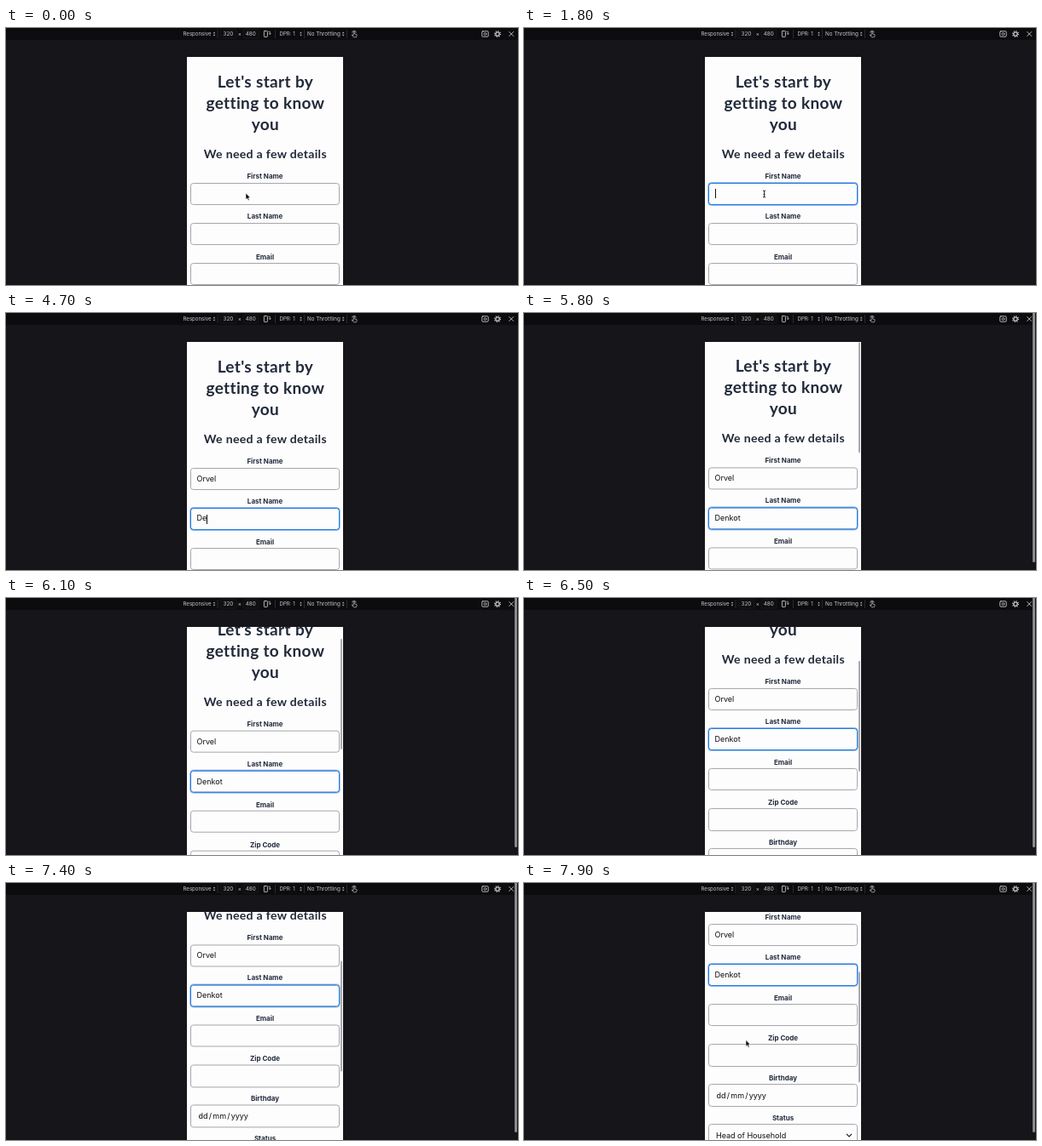
Recreate the animation shown at these times as an HTML page. Size 600 by 302 pixels, loop 8000 ms.

```html
<!DOCTYPE html>
<html lang="en">
<head>
<meta charset="utf-8">
<title>Form in responsive view</title>
<style>
@property --y { syntax: "<length>"; inherits: true; initial-value: 0px; }
html, body { margin: 0; width: 100%; height: 100%; overflow: hidden; background: #16151a; }
.stage { position: relative; width: 600px; height: 302px; overflow: hidden; background: #16151a; }
.bar { position: absolute; left: 0; top: 0; }
.bar text { font: 6.3px Inter, sans-serif; fill: #c9c9ce; }

.panel {
  position: absolute; left: 212px; top: 34px; width: 183px; height: 268px;
  overflow: hidden; background: #fdfdfe; color: #212a39;
  animation: scroll 8s infinite;
}
.page { position: absolute; inset: 0; transform: translateY(calc(-1 * var(--y))); }
h1, h2 { position: absolute; left: .4px; width: 100%; margin: 0; text-align: center; font-family: Lato, sans-serif; font-weight: 700; }
h1 { top: 15.8px; font-size: 19px; line-height: 25.2px; letter-spacing: .35px; }
h2 { top: 104px; font-size: 14.1px; line-height: 20px; letter-spacing: .3px; white-space: nowrap; }
.form { position: absolute; left: 4px; top: 134.3px; width: 175px; }
.field { height: 47.15px; }
.label { margin-bottom: 1.4px; text-align: center; font: 700 8px/12px Inter, sans-serif; }
.box {
  position: relative; box-sizing: border-box; height: 26.5px; padding-left: 6.5px;
  display: flex; align-items: center; border: 1px solid #a6a6ab; border-radius: 3.5px;
  font: 9px/12px Inter, sans-serif; color: #0c0c0e; background: #fdfdfe; white-space: nowrap;
}
.ring { position: absolute; inset: -1px; border: 1px solid #2479de; border-radius: 3.5px; box-shadow: 0 0 0 .4px #2479de; }
.caret { width: .9px; height: 11px; background: #111; }
.date, .select { padding-left: 8px; }
.date span { padding: 0 .6px; }
.select svg { position: absolute; right: 5px; top: 9.5px; }

.thumb { position: absolute; background: #a9a9ad; border-radius: 2px; }
.inner { right: 1px; top: 0; width: 2.2px; height: 130px; transform: translateY(calc(var(--y) * .525)); }
.outer { left: 595.5px; top: -3px; width: 3px; height: 296px; background: #8b8b8f; }

.mouse { position: absolute; left: 0; top: 0; overflow: visible; animation: move 8s infinite; }

@keyframes scroll {
  0%, 71.25% { --y: 0px; }
  72.5% { --y: .6px; animation-timing-function: cubic-bezier(.4, 0, .6, .86); }
  81.25% { --y: 76px; animation-timing-function: cubic-bezier(.3, .6, .6, 1); }
  88.75% { --y: 87px; animation-timing-function: cubic-bezier(.3, 0, .4, 1); }
  98.75%, 100% { --y: 134px; }
}
@keyframes move {
  0%, 94% { transform: translate(281px, 194px); }
  98.5%, 100% { transform: translate(260px, 184.5px); }
}
</style>
</head>
<body>
<div class="stage">
  <svg class="bar" width="600" height="15">
    <defs>
      <path id="updown" d="M-1.3 -.7L0 -2.5L1.3 -.7ZM-1.3 .7L0 2.5L1.3 .7Z" fill="#b9b9be"/>
    </defs>
    <rect width="600" height="14" fill="#0c0c0e"/>
    <g fill="#0f0f11" stroke="#222226" stroke-width=".5">
      <rect x="251" y="1.8" width="19" height="10.4" rx="1"/>
      <rect x="278" y="1.8" width="18" height="10.4" rx="1"/>
    </g>
    <path d="M248 2V12M315.5 2V12M349.5 2V12M399.5 2V12" stroke="#38383e" stroke-width=".7"/>
    <text x="207.5" y="9.3" style="font-size:6.1px">Responsive</text>
    <text x="254.5" y="9.3">320</text>
    <text x="271.8" y="9.3">×</text>
    <text x="280.7" y="9.3">480</text>
    <text x="320.5" y="9.3" style="font-size:6.1px">DPR: 1</text>
    <text x="353" y="9.3">No Throttling</text>
    <use href="#updown" x="244" y="7"/>
    <use href="#updown" x="345.5" y="7"/>
    <use href="#updown" x="395.2" y="7"/>
    <g fill="none" stroke="#c4c4c9" stroke-width=".9" stroke-linecap="round" stroke-linejoin="round">
      <rect x="302.4" y="3.5" width="4" height="7" rx=".7"/>
      <path d="M307.8 4.2H309.3V7.3M308.2 6.4L309.3 7.6L310.3 6.4" stroke-width=".7"/>
      <path d="M407.2 8.2V4.6Q408 3.8 408.7 4.6V7L411 7.6Q411.6 8.8 410.4 10.8H407.4L405.4 8.4ZM405.7 5A2.3 2.3 0 0 1 410.2 5" stroke-width=".7"/>
      <rect x="557.8" y="3.8" width="7.4" height="6.4" rx="1"/>
      <circle cx="561.5" cy="7" r="1.4" stroke-width=".8"/>
      <circle cx="576" cy="7" r="2.2" stroke-width="1.3"/>
      <circle cx="576" cy="7" r="3.4" stroke-width="1.3" stroke-dasharray="1.1 1.57" stroke-linecap="butt"/>
      <path d="M589.7 4.5L594.7 9.5M594.7 4.5L589.7 9.5"/>
    </g>
  </svg>

  <div class="panel">
    <div class="page">
      <h1>Let's start by<br>getting to know<br>you</h1>
      <h2>We need a few details</h2>
      <div class="form">
        <div class="field"><div class="label">First Name</div><div class="box" id="first"></div></div>
        <div class="field"><div class="label">Last Name</div><div class="box" id="last"></div></div>
        <div class="field"><div class="label">Email</div><div class="box"></div></div>
        <div class="field"><div class="label">Zip Code</div><div class="box"></div></div>
        <div class="field"><div class="label">Birthday</div><div class="box date"><span>dd</span><span>/</span><span>mm</span><span>/</span><span>yyyy</span></div></div>
        <div class="field"><div class="label">Status</div><div class="box select">Head of Household
          <svg width="8" height="6"><path d="M1 1L4 4L7 1" fill="none" stroke="#222" stroke-width="1.1"/></svg></div></div>
      </div>
    </div>
    <div class="thumb inner"></div>
  </div>
  <div class="thumb outer"></div>

  <svg class="mouse" width="1" height="1">
    <path class="arrow" d="M0 0V7.6L1.7 6L2.9 8.7L4.2 8.1L3 5.5H5.3Z" fill="#000" stroke="#fff" stroke-width=".6"/>
    <path class="beam" d="M-1 -3Q.4 -3 .5 -2Q.6 -3 2 -3M.5 -2V4M-1 5Q.4 5 .5 4Q.6 5 2 5M-.4 1.6H1.4" fill="none" stroke="#111" stroke-width=".9"/>
  </svg>
</div>
<script>
const LOOP = 8000;
const LEAD = 20; // switch just ahead of each tick

// Switch a property between its off and on value at the given times, starting off.
function toggle(el, times, prop = "opacity", off = 0, on = 1) {
  const frames = [0, ...times].map((t, i) => ({
    offset: Math.max(0, t - LEAD) / LOOP, [prop]: i % 2 ? on : off, easing: "step-end",
  }));
  frames.push({ ...frames.at(-1), offset: 1 });
  el.animate(frames, { duration: LOOP, iterations: Infinity });
}

function add(parent, tag, name, text = "") {
  const el = parent.appendChild(document.createElement(tag));
  el.className = name;
  el.textContent = text;
  return el;
}

function typeInto(id, text, { keys, focus, caret }) {
  const box = document.getElementById(id);
  toggle(add(box, "i", "ring"), focus);
  const label = add(box, "span", "text");
  [...text].forEach((ch, i) => toggle(add(label, "span", "", ch), [keys[i]], "fontSize", "0px", "9px"));
  toggle(add(box, "i", "caret"), caret);
}

typeInto("first", "Orvel", {
  keys: [2400, 2800, 3000, 3100, 3200], focus: [1000, 4100], caret: [1000, 1250, 1800, 3600],
});
typeInto("last", "Denkot", {
  keys: [4500, 4700, 4900, 5100, 5200, 5300], focus: [4100], caret: [4100, 5800, 6700, 7300],
});

toggle(document.querySelector(".arrow"), [400, 7600], "opacity", 1, 0);
toggle(document.querySelector(".beam"), [400, 2400]);
document.querySelectorAll(".thumb").forEach(el => toggle(el, [5800]));
</script>
</body>
</html>
```
